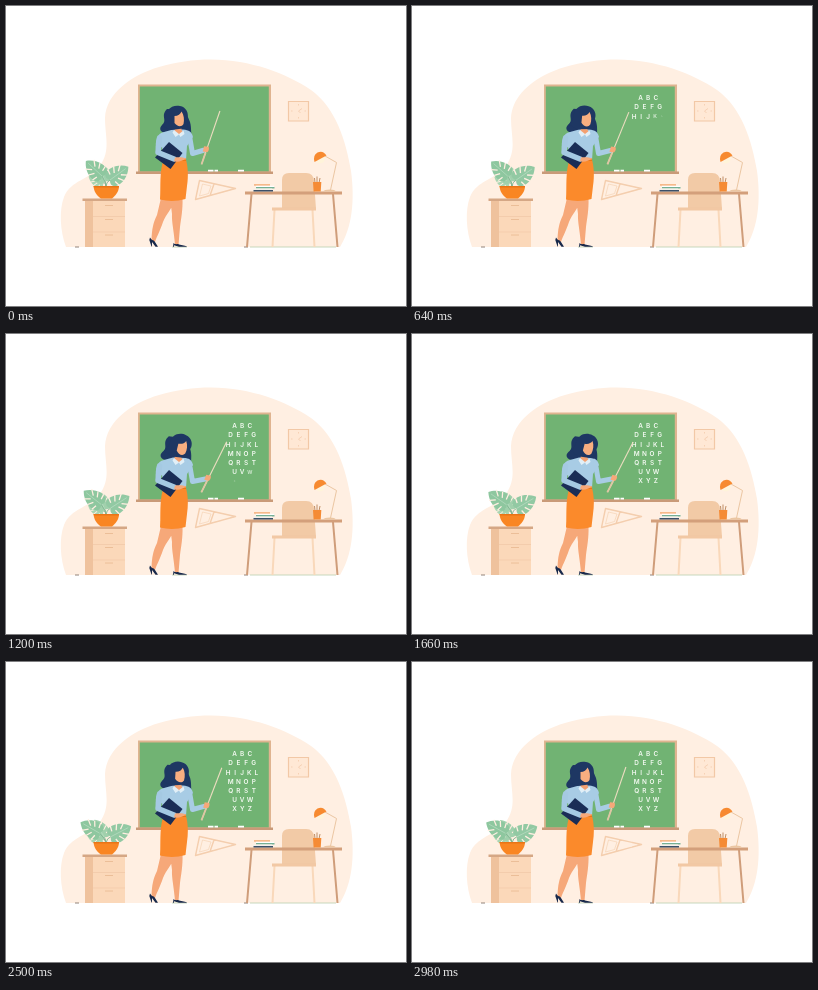
Write an HTML page that moves like this. It is 400 px wide and 300 px high and loops after 3 s.

```html
<!DOCTYPE html>
<html lang="en">
<head>
<meta charset="utf-8">
<title>Alphabet lesson</title>
<style>
html, body { margin: 0; width: 100%; height: 100%; overflow: hidden; background: #fff; }
svg { display: block; width: 100vw; height: 100vh; }
#letters { font: 600 6.4px Inter, "Open Sans", sans-serif; fill: #f4faf2; text-anchor: middle; }
</style>
</head>
<body>
<svg viewBox="0 0 400 300">
  <path fill="#ffefe2" d="M60 241C54 225 53 204 58 191C65 174 83 174 94 160C105 144 99 131 99 112C100 87 126 69 153 61C170 56 187 53.500 205 53.500C245 54 280 67 305 84C330 102 340 135 345 165C349 195 346 222 334 241Z"/>
  <path stroke="#b9cfae" stroke-width=".8" d="M244 241H330M166 241H181"/>
  <path stroke="#76655c" stroke-width=".8" d="M69 241H73M238 241H242"/>

  <g id="board">
    <path fill="#dfb490" d="M132 78.500H265V167H132Z"/>
    <path fill="#71b373" d="M133.800 80.500H262.800V165.500H133.800Z"/>
    <path fill="#c99a78" d="M130 165.500H267V168H130Z"/>
    <path stroke="#fff" stroke-width="1.7" d="M202 164.600H207.500M208.500 164.600H212M232 164.600H238"/>
  </g>
  <g id="letters"></g>

  <g id="clock" fill="none" stroke="#f2c8a6">
    <path fill="#ffe8d5" stroke-width="1.2" d="M282.500 95.500H302.500V115H282.500Z"/>
    <path stroke-width=".7" d="M292.500 98V99.500M292.500 111V112.500M285 105H286.500M298.500 105H300M292.500 105L296 102.500M292.500 105L294.500 107"/>
  </g>

  <g id="setSquare" fill="none" stroke="#f4ceae" stroke-width="1.400" stroke-linejoin="round">
    <path d="M193.500 174.500L229.500 182.500L189.500 193.500ZM208 178L204 189.500"/>
    <path stroke-width=".6" d="M196.500 178L205 180L202.500 187.500L193.500 190Z"/>
  </g>

  <g id="cabinet">
    <path fill="#fbd8b9" d="M79 194H119V241H79Z"/>
    <path fill="#efc29d" d="M79 194H87V241H79Z"/>
    <path fill="#d5a785" d="M76.500 192.500H121V195H76.500Z"/>
    <path stroke="#f1c8a6" stroke-width=".7" d="M87 210.500H119M87 226H119"/>
    <path stroke="#e7b890" stroke-width=".8" d="M99 199.500H107M99 213.500H107M99 229H107"/>
  </g>
  <g id="plant"></g>
  <path fill="#f98623" d="M87.500 180H113C113 186 109 190 106 192.500H95C91 190 88 186 87.500 180Z"/>
  <path fill="#e97417" d="M87.500 180H113L112.700 181.500H88Z"/>

  <g id="furniture">
    <path fill="none" stroke="#f9d8ba" stroke-width="2" d="M268.500 204L266.500 241M306.500 204L308.500 241"/>
    <path fill="#f2caa6" d="M276 203V174Q276 167 283 167H300Q307.500 167 308 175L310 203Z"/>
    <path fill="#f2c8a4" d="M266 201.500H310V204.500H266Z"/>
    <path fill="none" stroke="#cf9d7a" stroke-width="2" d="M245.500 188L241 241M327 188L331.500 241"/>
    <path fill="#d39f7b" d="M239 185.500H336V188.500H239Z"/>
    <path fill="#f6b98a" d="M248 178H264V179.800H248Z"/>
    <path fill="#fff" d="M250 179.800H268V181.300H250Z"/>
    <path fill="#76b096" d="M250 181H268.500V182.500H250Z"/>
    <path fill="#f3f0e9" d="M247 182.500H266V184H247Z"/>
    <path fill="#3b5069" d="M247.500 184H267V185.500H247.500Z"/>
    <path stroke="#b9845a" stroke-width=".9" d="M309 177L308.500 172M311 177V170.500M313 177L314 172"/>
    <path fill="#f58b35" d="M307 176H315.300L314.700 185.500H307.600Z"/>
    <path fill="none" stroke="#ebc6a2" stroke-width="1" d="M319 150L330.500 156.500L324.500 184"/>
    <path fill="#ebc6a2" d="M317 185.500Q318 183.500 324 183.500Q329 183.500 330 185.500Z"/>
    <path fill="#fff4da" d="M310 156L319 150.500Q319 157.500 313.500 157.500Z"/>
    <path fill="#f78a30" d="M308.500 156Q306.500 149.500 311.500 146.500Q317 144 320.500 149.500Z"/>
  </g>

  <g id="teacher">
    <path id="backHair" fill="#1e3763" d="M161 103C154 110 162 114 156 119C152 123 155 128 163 127C169 134 181 127 187 131.500C184 127 186 123 184 116L179 104Z"/>
    <path fill="#f6a879" d="M155 192H169C166 204 160 208 157 216C154 225 151 230 149 236L145.500 234C146 223 147 217 151 209ZM164 192H176.500C177 204 175 213 174 221L172.500 239H169C168 225 165.500 216 166 208Z"/>
    <path fill="#18294b" d="M144 231.500C146 235 148.500 234 149 236L152 240.800H149.500L146 236V240.500H145.500L143.300 234ZM167.500 237C169 239 171.500 237.500 173 238.500C176 239.500 180 239.300 181 240.800H173L168 239.200V240.800H167Z"/>
    <path fill="#a8cce5" d="M167 123.500L177 123.500C183 124 186 126 187 131L181 140L180 154H158L156 141L150 144C149 135 151 127 158 126Z"/>
    <path fill="#fb8a2b" d="M158 152H179.500C182 160 182.500 170 181 180L179.500 193C171 195.500 162 195.500 154 193.500C155 180 153 166 158 152Z"/>
    <path stroke="#ea7716" stroke-width="1" d="M158 154.500H180"/>
    <path fill="#1a2d56" d="M163 136L176.500 147L164.500 163L149 151.500Z"/>
    <path fill="none" stroke="#a5c9e2" stroke-width="5.500" stroke-linecap="round" stroke-linejoin="round" d="M153.500 132L152 146.500L168 153"/>
    <path fill="#f6a879" d="M169 151.500C173 151 177 151 180 152.500C177 155 173 156 168 155.500Z"/>
    <path fill="none" stroke="#a8cce5" stroke-width="5" stroke-linecap="round" stroke-linejoin="round" id="arm"/>
    <g id="pointer">
      <path stroke="#ecdcc0" stroke-width="1.100" d="M196 158V102"/>
      <path stroke="#dfc6a4" stroke-width="1.800" d="M196 158.500V146"/>
      <path fill="#f6a879" d="M192.500 140.500L197 139.500Q199 142 197.500 145L193 146Z"/>
    </g>
    <path fill="#f3a071" d="M169 116H175.500V124L177 126L173 129L168.500 125.500Z"/>
    <path fill="#e1eff7" d="M168 124L173 128L177.500 124.500L178.500 128L174.500 131L173 128.500L169.500 131L166.500 126.500Z"/>
    <g id="head">
      <path fill="#1e3763" d="M156 120C162 116 158 110 162 104C165 100 170 99 174 100C180 101 183 107 181.500 112C180.500 116 183 119 181 122L165 124Z"/>
      <path fill="#f8ae80" d="M168.500 110C172 110 174.500 108 175.500 105.500C178 109 178.500 114 177.500 118C175.500 121.500 171 120.500 168.500 117Z"/>
    </g>
  </g>
</svg>
<script>
const LOOP = 3000;
const $ = id => document.getElementById(id);

function add(parent, tag, attrs) {
  const node = document.createElementNS("http://www.w3.org/2000/svg", tag);
  for (const key in attrs) node.setAttribute(key, attrs[key]);
  return parent.appendChild(node);
}

const letters = [];
["ABC", "DEFG", "HIJKL", "MNOP", "QRST", "UVW", "XYZ"].forEach((row, r) => {
  const gap = row.length === 5 ? 7 : 7.7;
  [...row].forEach((char, i) => {
    const x = 236.2 + (i - (row.length - 1) / 2) * gap;
    const y = 91.8 + r * 9.2;
    const node = add($("letters"), "text", { y: 2.4 });
    node.textContent = char;
    letters.push({ node, x, y, start: 80 + letters.length * 47 });
  });
});

// x, y, heading, size, colour, sway
const leaves = [
  [97, 177, -66, .75, "#a9d5b2", -9],
  [99, 175, -22, .95, "#a0d0ac", -8],
  [96, 170, -47, 1.05, "#8ec79f", -14],
  [104, 174, 54, 1.08, "#92c9a3", 9]
].map(([x, y, heading, size, fill, sway]) => {
  const group = add($("plant"), "g", {});
  add(group, "path", { d: `M100 181Q100 176 ${x} ${y}`, fill: "none", stroke: "#83b793", "stroke-width": .9 });
  const leaf = add(group, "g", { transform: `translate(${x} ${y}) rotate(${heading}) scale(${size})` });
  add(leaf, "path", { fill, d: "M0 0C-5 4-9 0-8.500-6C-8-13-4-18 0-21C4-18 8-13 8.500-6C9 0 5 4 0 0Z" });
  add(leaf, "path", { stroke: "#ffefe2", "stroke-width": 1.2, d: "M-9-4L-4-3M-8-10L-3-7M-6-16L-2-11M9-4L4-3M8-10L3-7M6-16L2-11" });
  add(leaf, "path", { stroke: "#c3e2ca", "stroke-width": .5, d: "M0 0V-18" });
  return { group, sway };
});

const rotate = (node, angle, x, y) => node.setAttribute("transform", `rotate(${angle} ${x} ${y})`);

function draw(time) {
  const phase = time / LOOP;
  const lean = (1 - Math.cos(phase * 2 * Math.PI)) / 2;
  const spread = (1 - Math.cos(phase * Math.PI)) / 2;

  for (const { node, x, y, start } of letters) {
    const p = Math.min(1, Math.max(0, (time - start) / 110));
    node.setAttribute("transform", `translate(${x} ${y}) scale(${p})`);
    node.setAttribute("opacity", p);
  }
  for (const { group, sway } of leaves) rotate(group, sway * spread, 100, 181);

  const angle = 19 + 8.5 * lean;
  const rad = angle * Math.PI / 180;
  rotate($("pointer"), angle, 196, 157);
  $("arm").setAttribute("d", `M183.500 130L186.500 147.500L${193 + 14 * Math.sin(rad)} ${157.5 - 14 * Math.cos(rad)}`);
  rotate($("head"), 15 * lean, 172, 126);
  rotate($("backHair"), 5 * lean, 172, 126);
}

const origin = performance.now();
function tick() {
  draw((performance.now() - origin) % LOOP);
  requestAnimationFrame(tick);
}
tick();
</script>
</body>
</html>
```
